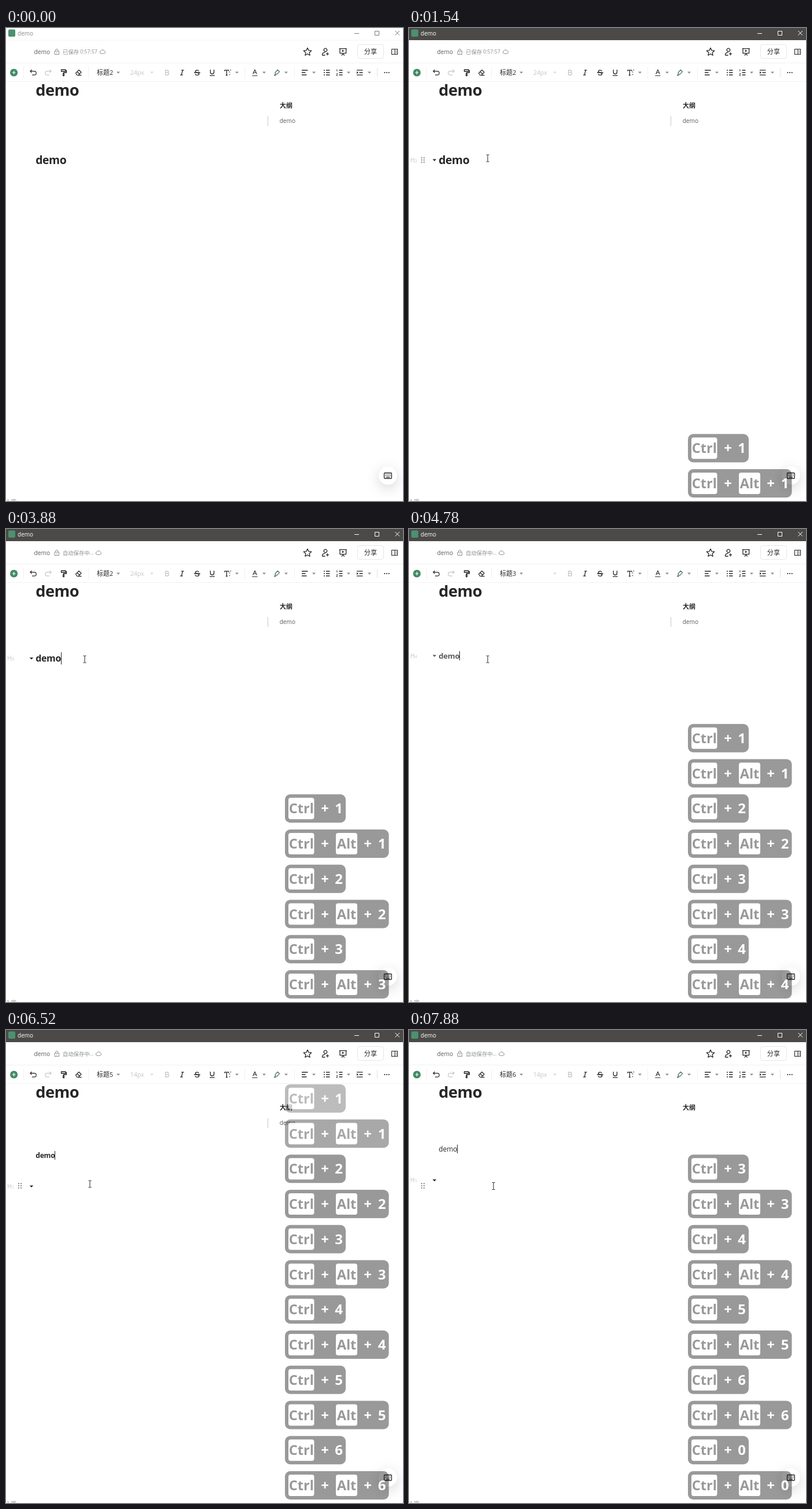
Animation, 686 px wide and 817 px high, one loop 8000 ms. Source, as an HTML page:

```html
<!DOCTYPE html>
<html lang="zh">
<head>
<meta charset="utf-8">
<title>demo</title>
<style>
  html, body { margin: 0; width: 100%; height: 100%; overflow: hidden; background: #fff; }
  svg { display: block; width: 686px; height: 817px; }
  text { font-family: "Open Sans", "Noto Sans CJK SC", "Noto Sans CJK", sans-serif; white-space: pre; }
  .zh { font-family: "Noto Sans CJK SC", "Noto Sans CJK", "Open Sans", sans-serif; }
  .head { font-weight: 700; letter-spacing: -0.02em; }
</style>
</head>
<body>
<svg id="stage" viewBox="0 0 686 817" xmlns="http://www.w3.org/2000/svg">
  <defs>
    <filter id="soft" x="-150%" y="-150%" width="400%" height="400%">
      <feDropShadow dx="0" dy="6" stdDeviation="11" flood-color="#000" flood-opacity=".17"/>
    </filter>
  </defs>
  <rect width="686" height="817" fill="#fff"/>
  <g id="chrome"></g>
  <g id="doc"></g>
  <g id="keys"></g>
  <g id="mouse"></g>
</svg>
<script>
const NS = 'http://www.w3.org/2000/svg';
const LOOP = 8000;
const INK = '#262626', MID = '#585a5a', PALE = '#c4c6c5', LINE = '#f0f1f1';
const $ = id => document.getElementById(id);

function add(parent, tag, attrs, content) {
  const el = document.createElementNS(NS, tag);
  for (const k in attrs) el.setAttribute(k, attrs[k]);
  if (content !== undefined) el.textContent = content;
  parent.appendChild(el);
  return el;
}
const set = (el, attrs) => { for (const k in attrs) el.setAttribute(k, attrs[k]); };
const show = (el, on) => el.setAttribute('visibility', on ? 'visible' : 'hidden');
const group = parent => add(parent, 'g', {});
const text = (g, x, y, size, fill, str, extra) =>
  add(g, 'text', { x, y, 'font-size': size, fill, ...extra }, str);
const line = (g, d, stroke = INK, w = 1.2, extra) =>
  add(g, 'path', { d, stroke, fill: 'none', 'stroke-width': w, 'stroke-linejoin': 'round', ...extra });
const shape = (g, d, fill = INK) => add(g, 'path', { d, fill });
const box = (g, x, y, width, height, rx, fill, extra) =>
  add(g, 'rect', { x, y, width, height, rx, fill, ...extra });
const dot = (g, cx, cy, r, fill = INK) => add(g, 'circle', { cx, cy, r, fill });
const tri = (g, x, y = 77, fill = '#8a8f8d', s = 3) =>
  shape(g, `M${x - s} ${y - s / 2}h${2 * s}l${-s} ${s * 1.1}z`, fill);
const ZH = { class: 'zh' }, CENTER = { 'text-anchor': 'middle' };

// Title bar
const ui = $('chrome');
const bar = box(ui, 0, 0, 686, 21, 0, '#4b4a48');
box(ui, 4, 2.5, 12, 12.5, 2, '#4c9170');
const barText = text(ui, 20, 12.5, 10, '#fff', 'demo');
const winIcons = group(ui);
line(winIcons, 'M602 9.5h8M637.5 5.5h7v7h-7zM672.5 5l7.5 7.5M680 5l-7.5 7.5', 'inherit', 1);
winIcons.firstChild.removeAttribute('stroke');

// Header
text(ui, 48.5, 44.6, 10.2, MID, 'demo');
line(ui, 'M84 40h7.5v5.5H84zM85.7 40v-1.6a2 2 0 0 1 4.1 0V40M87.7 42v1.6', '#8a8f8d', 1);
const saved = group(ui), saving = group(ui);
const GREY = '#8a8f8d';
text(saved, 98, 44.6, 9.4, GREY, '已保存', ZH);
text(saved, 128, 44.4, 8.8, GREY, '0:57:57');
text(saving, 98, 44.6, 9.3, GREY, '自动保存中', ZH);
text(saving, 144, 44.4, 9, GREY, '...');
const cloud = line(ui, 'M-2.6 3.2h5a2.2 2.2 0 0 0 .5-4.3a3.1 3.1 0 0 0-5.8-.4a2.4 2.4 0 0 0 .3 4.7z', GREY, 1);

let star = '';
for (let i = 0; i < 10; i++) {
  const r = i % 2 ? 3.4 : 7, a = i * Math.PI / 5 - Math.PI / 2;
  star += (i ? 'L' : 'M') + (521 + r * Math.cos(a)).toFixed(1) + ' ' + (41.4 + r * Math.sin(a)).toFixed(1);
}
line(ui, star + 'z', INK, 1.3);
line(ui, 'M552 35.2a2.8 2.8 0 1 1-.1 0zM546.5 47v-1c0-2.6 2-3.7 5-3.7M546.5 47h5M555.5 42.2v5M553 44.7h5', INK, 1.3);
line(ui, 'M575.8 35.6h13M577 35.6v8h10.600v-8M582.3 43.600v2M579.5 47.300l2.800-2 2.800 2', INK, 1.3);
shape(ui, 'M580.8 37.600l3.600 2-3.600 2z');
box(ui, 607.5, 28.5, 45, 24, 4, '#fff', { stroke: '#e4e6e5' });
text(ui, 630, 44.8, 11.2, INK, '分享', { ...ZH, ...CENTER });
line(ui, 'M666.5 36.500h10v9h-10zM672 36.500v9M674 39h1M674 41h1M674 43h1', INK, 1.1);
line(ui, 'M0 60.500h686M0 92.500h686', LINE, 1);

// Toolbar
line(ui, 'M30.500 67v20M142.500 67v20M412.500 67v20M498.500 67v20', LINE, 1);
line(ui, 'M641.500 69v15', '#dfe1e0', 1);
dot(ui, 13.6, 77, 6.6, '#438a66');
line(ui, 'M10.600 77h6M13.600 74v6', '#fff', 1.2);
line(ui, 'M44.500 72l-2.700 2.700 2.700 2.700M42 74.700h7a3.200 3.200 0 0 1 0 6.400h-4');
line(ui, 'M75.500 72l2.700 2.700-2.700 2.700M78 74.700h-7a3.200 3.200 0 0 0 0 6.400h4', PALE);
line(ui, 'M95.500 72h7.500v3h-7.500zM103 73.500h1.500v3.500h-5v2M98.600 79h1.800v3.500h-1.800z', INK, 1.3);
line(ui, 'M120.500 78l5.500-5.500 4 4-5 5h-2.300zM123 75.500l4 4M124 81.700h6.500');
text(ui, 157, 81, 10.9, INK, '标题', { ...ZH, 'font-weight': 500 });
const level = text(ui, 179, 80.8, 10.6, INK, '', { 'font-weight': 500 });
const sizeLabel = text(ui, 214.7, 80.8, 10.6, PALE, '');
[194, 399, 446, 484, 532, 592, 628].forEach(x => tri(ui, x));
tri(ui, 252, 77, '#d8dad9');
line(ui, 'M275.500 73h3.200a1.900 1.900 0 0 1 0 3.800h-3.200zM275.500 76.800h3.700a2.100 2.100 0 0 1 0 4.200h-3.700z', PALE, 1.3);
line(ui, 'M303 72.800h4.500M301 81.200h4.500M305.200 72.800l-2 8.400', INK, 1.3);
line(ui, 'M333.200 74.500c-.6-2.300-5.900-2.300-5.900.4 0 1.400 1.500 1.800 3 2.100 1.800.4 3.300.8 3.300 2.300 0 2.700-6 2.700-6.700 0M325 77h10.500', INK, 1.3);
line(ui, 'M353.200 72v4.300a3.100 3.100 0 0 0 6.200 0V72M352 82.200h8.600', INK, 1.3);
line(ui, 'M377.800 74.500v-1.700h7v1.700M381.300 72.800v8.700M379.800 81.500h3', INK, 1.3);
[[386.5, 76], [386.5, 80.5], [388.2, 72.6]].forEach(([x, y]) => dot(ui, x, y, .8));
line(ui, 'M426.700 79.500l3.300-7.500 3.300 7.500M427.900 77h4.200', INK, 1.1);
line(ui, 'M425.200 82.400h9.400', MID, 1.3);
line(ui, 'M465.200 77l4-4.700 3.300 3-4.200 4.500h-2.300l-.8-.8zM465.700 79.500l-2.200 2.500h3.500', '#4a6a60', 1.2);
line(ui, 'M511 73h10.500M511 77h6.500M511 81h8.500', INK, 1.3);
line(ui, 'M553 73h6.500M553 77h6.500M553 81h6.500M575.500 73h6M575.500 77h6M575.500 81h6', INK, 1.3);
[73, 77, 81].forEach(y => dot(ui, 550, y, 1));
line(ui, 'M571 72.500l1-.7v3.200M570.700 78.800h2.400l-2.200 3.400h2.400', INK, .9);
line(ui, 'M606 72.800h10.500M610.500 77h6M606 81.200h10.500', INK, 1.3);
shape(ui, 'M606 75l3 2-3 2z');
[654.3, 658, 661.7].forEach(x => dot(ui, x, 77, 1.1));

// Page
const doc = $('doc');
text(doc, 51.3, 117, 27.2, INK, 'demo', { class: 'head' });
text(doc, 473, 138.4, 10.9, INK, '大纲', { ...ZH, 'font-weight': 700 });
const outline = group(doc);
text(outline, 472.7, 164.2, 10.1, MID, 'demo');
line(outline, 'M452.500 152v17', '#d4d6d5', 1.5);
text(doc, 1, 820.500, 9.5, '#8a8f8d', '1 字', ZH);

const heading = text(doc, 51.3, 0, 10, INK, 'demo');
const caret = box(doc, 0, 0, 1, 10, 0, '#222');
const gutter = group(doc);
const tagH = text(gutter, 2.3, 3.7, 10.3, PALE, 'H');
const tagN = text(gutter, 9.7, 3.9, 8, PALE, '');
const fold = tri(gutter, 44, 0, INK, 3.2);
const grip = group(doc);
[22, 26].forEach(x => [-3.7, 0, 3.7].forEach(y => dot(grip, x, y, .95, MID)));

const fab = group(doc);
add(fab, 'circle', { cx: 659.8, cy: 773, r: 15.5, fill: '#fff', filter: 'url(#soft)' });
box(fab, 653.5, 768.500, 12.800, 9.500, 1, 'none', { stroke: INK, 'stroke-width': 1.3 });
line(fab, 'M655.500 771h9M655.500 773.300h9', INK, 1.2, { 'stroke-dasharray': '1.300 1.250' });
line(fab, 'M657 775.800h6');

// Pressed keys: two rows per stroke
const strokes = [1540, 2760, 3840, 4780, 5770, 6310, 7840];
const digits = '1234560';
const PITCH = 60.75;
const rows = [];
const cap = (g, x, w, label) => {
  box(g, x, 6, w, 37, 4, '#fff');
  text(g, x + w / 2, 33, 23.6, '#999', label, { ...CENTER, 'font-weight': 700 });
};
const sign = (g, x, label) => text(g, x, 33, 24, '#fff', label, { ...CENTER, 'font-weight': 700 });
strokes.forEach((at, i) => [0, 1].forEach(alt => {
  const g = group($('keys'));
  box(g, 0, 0, alt ? 179.500 : 105, 49, 9, '#000', { 'fill-opacity': .4 });
  cap(g, 6, 44.500, 'Ctrl');
  sign(g, 69, '+');
  if (alt) { cap(g, 88, 37, 'Alt'); sign(g, 143, '+'); }
  sign(g, alt ? 167.500 : 93, digits[i]);
  rows.push({ g, at, fadeAt: at + (alt ? 4962 : 4940), fade: alt ? 130 : 120 });
}));

// I-beam pointer
const beam = $('mouse');
line(beam, 'M-2.500-6h2l.500.500.500-.500h2M0-5.500v11M-2.500 6h2l.500-.500.500.500h2', '#222', 1);

// Block styles: time, level, font size, baseline, caret x / top / height, gutter y
const blocks = [
  [0, 2, 19.3, 235, 104, 216, 24, 228],
  [1590, 1, 22.4, 241, 113, 218, 29, 232],
  [2790, 2, 19.3, 235, 104, 216, 24, 228],
  [3880, 3, 15.9, 229, 95, 213, 21, 223.5],
  [4780, 4, 13.1, 223.5, 87, 211, 16, 219],
  [5770, 5, 12.1, 221.300, 84, 209, 15, 217],
  [7880, 0, 11.9, 209.600, 83, 198, 15, 205]
];
const labels = [[0, 2, '24px'], [1880, 1, ''], [3080, 2, '24px'], [4210, 3, ''],
  [5110, 4, '16px'], [6100, 5, '14px'], [6630, 6, '14px']];
const caretOn = [[730, 1260], [1590, 2080], [2620, 3330], [3880, 4420],
  [4780, 5310], [5770, 6310], [6350, 6840], [7370, LOOP]];
const path = [[40, 22, 394], [260, 39, 323], [520, 96, 252], [740, 132, 223], [800, 132, 223], [850, 136, 225],
  [4910, 136, 225], [5390, 142, 250], [6310, 142, 250], [6520, 145, 266], [6630, 146, 269.500], [LOOP, 146, 269.500]];

const within = (t, a, b) => t >= a && t < b;
const latest = (list, t) => list.filter(e => t >= e[0]).pop();
const clamp = v => Math.max(0, Math.min(1, v));

function pointer(t) {
  const i = Math.max(1, path.findIndex(p => p[0] >= t));
  const [t0, x0, y0] = path[i - 1], [t1, x1, y1] = path[i];
  const k = clamp((t - t0) / (t1 - t0));
  return [x0 + (x1 - x0) * k, y0 + (y1 - y0) * k];
}

function drawChrome(t) {
  const active = t >= 730, busy = t >= 1670;
  const fg = active ? '#fff' : '#777';
  bar.setAttribute('fill', active ? '#4b4a48' : '#fff');
  set(bar, { stroke: active ? 'none' : '#f4f4f4' });
  barText.setAttribute('fill', active ? '#fff' : '#8a8a8a');
  winIcons.setAttribute('stroke', fg);
  show(saved, !busy);
  show(saving, busy);
  cloud.setAttribute('transform', `translate(${busy ? 160 : 167} 41)`);
  const [, n, px] = latest(labels, t);
  level.textContent = n;
  sizeLabel.textContent = px;
}

function drawBlock(t) {
  const [, n, size, base, cx, cy, ch, gy] = latest(blocks, t);
  const ink = within(t, 4780, 4910) ? MID : INK;
  set(heading, { y: base, 'font-size': size, fill: ink, class: n ? 'head' : '' });
  set(caret, { x: cx, y: cy, height: ch });
  show(caret, caretOn.some(([a, b]) => within(t, a, b)));
  show(outline, t < 7880);

  const next = t >= 6430;
  const y = next ? (t >= 7880 ? 259.500 : 270) : gy;
  gutter.setAttribute('transform', `translate(0 ${y})`);
  tagN.textContent = next ? 1 : n;
  fold.setAttribute('fill', ink);
  show(gutter, within(t, 520, 5210) || next);
  grip.setAttribute('transform', `translate(0 ${next ? 269 : 228})`);
  show(grip, within(t, 520, 1590) || next);
}

function drawKeys(t) {
  const count = rows.filter(r => t >= r.at).length;
  rows.forEach((r, i) => {
    const alpha = t < r.at ? 0 : 1 - clamp((t - r.fadeAt) / r.fade);
    show(r.g, alpha > 0);
    set(r.g, { opacity: alpha, transform: `translate(482 ${762 - (count - 1 - i) * PITCH})` });
  });
}

function draw(t) {
  drawChrome(t);
  drawBlock(t);
  drawKeys(t);
  const [x, y] = pointer(t);
  show(beam, t >= 40);
  beam.setAttribute('transform', `translate(${x} ${y})`);
}

function tick() {
  draw(performance.now() % LOOP);
  requestAnimationFrame(tick);
}
draw(0);
tick();
</script>
</body>
</html>
```
